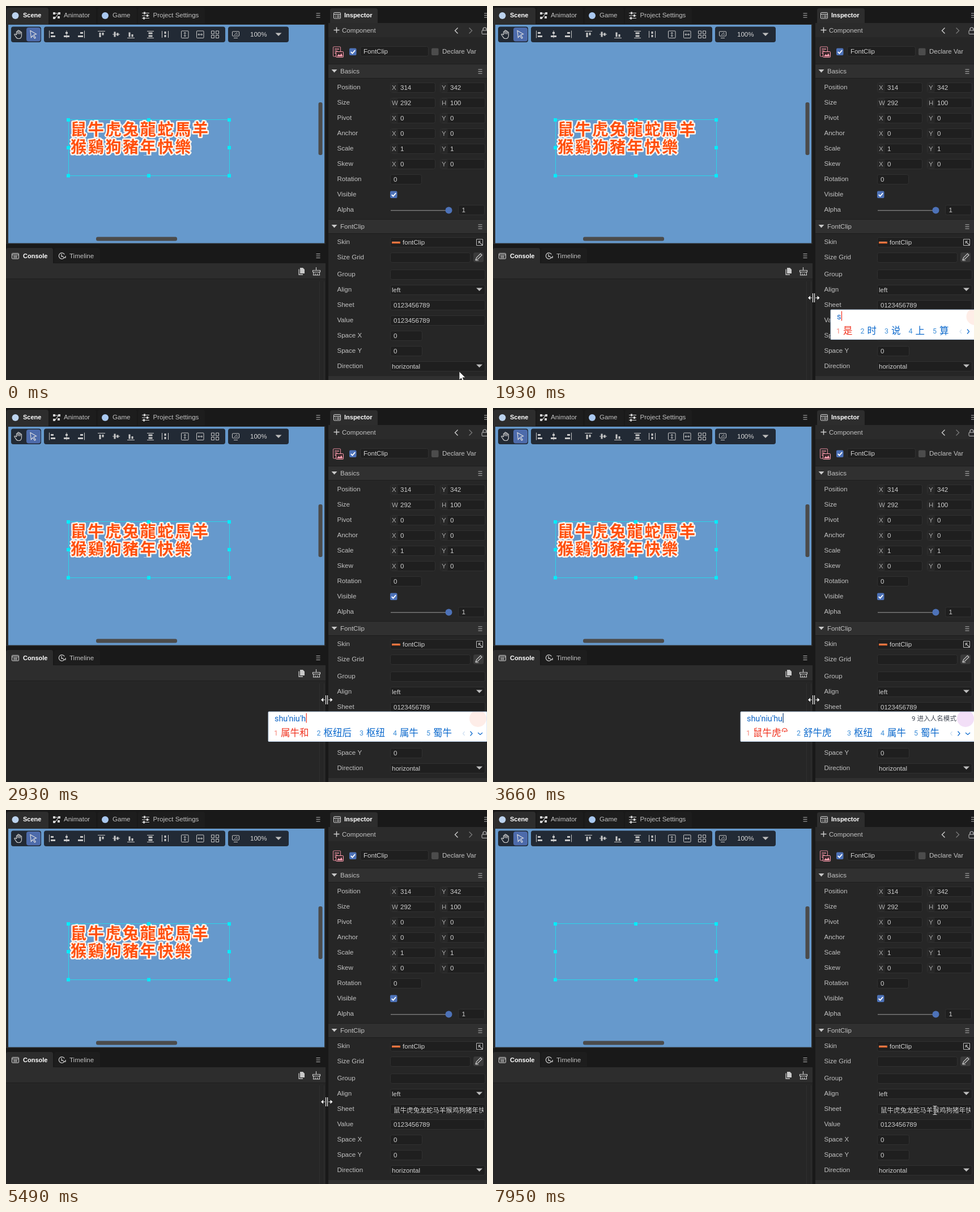
Animation of 849x660 px, one loop 8 s. Source, as an HTML page with a canvas:

```html
<!DOCTYPE html>
<html lang="en">
<head>
<meta charset="utf-8">
<title>Font clip editor</title>
<style>
html, body { margin: 0; width: 100%; height: 100%; overflow: hidden; background: #191919; }
canvas { display: block; }
</style>
</head>
<body>
<canvas id="stage" width="849" height="660"></canvas>
<script>
const g = document.getElementById('stage').getContext('2d');
const LOOP = 8000;
const UI = '11.55px "Liberation Sans", Arial, sans-serif';
const BOLD = 'bold 11px "Liberation Sans", Arial, sans-serif';
const CJK = '"Noto Sans CJK SC", "Noto Sans CJK", sans-serif';
const LABEL = '#c2c2c2', ICON = '#c8c8c8';
const ZODIAC = '鼠牛虎兔龙蛇马羊猴鸡狗猪年快乐';

function box(x, y, w, h, fill, r = 0, stroke) {
  g.beginPath();
  g.roundRect(x, y, w, h, r);
  if (fill) { g.fillStyle = fill; g.fill(); }
  if (stroke) { g.strokeStyle = stroke; g.lineWidth = 1; g.stroke(); }
}
function text(s, x, y, color = LABEL, font = UI, align = 'left') {
  g.font = font;
  g.fillStyle = color;
  g.textAlign = align;
  g.fillText(s, x, y);
}
function line(d, color = ICON, w = 1) {
  g.strokeStyle = color;
  g.lineWidth = w;
  g.stroke(new Path2D(d));
}
function shape(d, color = ICON) {
  g.fillStyle = color;
  g.fill(new Path2D(d));
}
function dot(x, y, r, color) {
  g.beginPath();
  g.arc(x, y, r, 0, 7);
  g.fillStyle = color;
  g.fill();
}
function clipped(x, y, w, h, draw) {
  g.save();
  g.beginPath();
  g.rect(x, y, w, h);
  g.clip();
  draw();
  g.restore();
}

const menu = (x, y) => line(`M${x - 3.5} ${y - 3.5}h7m-7 3.5h7m-7 3.5h7`, '#b5b5b5', 1.1);
const down = (x, y) => shape(`M${x - 5.5} ${y - 2.5}h11l-5.5 5.5z`, '#bdbdbd');
const field = (x, y, w, h = 18) => box(x + .5, y + .5, w - 1, h - 1, '#1f1f1f', 3, '#313131');
const tab = (x, y, w, h, on) => box(x, y, w, h, on ? '#2d2d2d' : '#1d1d1d', [4, 4, 0, 0]);
function check(x, y, on) {
  box(x, y, 12.5, 12.5, on ? '#4d72b8' : '#4c4c4c', 2);
  if (on) line(`M${x + 2.8} ${y + 6.3}l2.6 2.9 4.8-5.6`, '#fff', 1.8);
}
function pair(y, name, a, u, b, v) {
  text(name, 584.5, y + 4);
  [[678, a, u, 80], [766, b, v, 80]].forEach(([x, key, val, w]) => {
    field(x, y - 8, w);
    box(x + 1, y - 7, 13, 16, '#282828', 2);
    text(key, x + 3, y + 5, '#a8a8a8');
    text(val, x + 18, y + 5, '#d0d0d0');
  });
}
function row(y, name, val, w, x = 684) {
  text(name, 584.5, y + 4);
  field(678, y - 8, w);
  if (val) text(val, x, y + 5, '#d0d0d0');
}

function toolbar() {
  for (const [x, w] of [[9, 53], [67, 320], [392, 107]]) box(x, 36.5, w, 27.5, '#222a35', 4);
  box(36, 38, 25, 24.5, '#4d6bab', 4);
  line('M18.5 51v-5.500q1.200-1.500 2.200 0v4v-6q1.200-1.500 2.200 0v6v-5q1.200-1.500 2.200 0v5.500v-3.500q1.400-1.300 2.400 0v5q0 6-4.500 6h-1.500q-2.500 0-4-3l-2.800-4q.8-2.300 3.800.5', '#d8d8d8', 1.1);
  line('M43 43.500l10.500 6-4.500 1.500 3.300 5-1.800 1.300-3.200-5-3 3.300z', '#e2e2e2', 1.1);
  line('M76.500 43.500v13M107 43.500v13M138.500 43.500v13M162 44.500h13M188 50h13M214 56.500h13');
  line('M79 47.500h5m-5 6h8M105 47.500h4m-7 6h10M131 47.500h5m-9 6h9', ICON, 3.2);
  line('M166 47v8m5-8v4.500M192 45.500v9m5-7v5M218 46.500v8m5-4.500v4.500', ICON, 3);
  line('M249 44.500h12m-12 12h12M275.500 44v12m11-12v12');
  line('M251.500 48h7m-7 5h7M281 45v4m0 2v4', ICON, 3);
  g.strokeStyle = ICON;
  box(309.500, 44, 12.500, 12.500, null, 1, ICON);
  box(336.500, 44, 12.500, 12.500, null, 1, ICON);
  line('M315.800 46.500v7.500m-2-5.500l2-2 2 2m-4 3.500l2 2 2-2M339 50.300h7.500m-5.500-2l-2 2 2 2m3.500-4l2 2-2 2');
  for (const x of [362.5, 370.5]) for (const y of [44, 51.5]) box(x, y, 5, 5, null, 0, ICON);
  box(399.5, 45, 12, 8, null, 1, ICON);
  line('M402 56.500h7M403 51l5-4M407 51l2-2');
  text('100%', 431, 54, '#d8d8d8');
  down(481, 50);
}

function scene(showGlyphs) {
  tab(1, 3, 74, 30, true);
  tab(77, 3, 82, 28);
  tab(162, 3, 69, 28);
  tab(233, 3, 118, 28);
  box(0, 32, 564, 388, '#2a2a2a');
  box(4, 33, 558, 385.500, '#6699cc');
  dot(16.5, 17, 6, '#bcd3ee');
  text('Scene', 30, 20, '#fff', BOLD);
  shape('M83 11h4v4h-4zM92 11h4v4h-4zM83 19h4v4h-4zM91 18h4v4h-4z', '#d5d5d5');
  line('M87 13h5M87 21l5-7', '#d5d5d5', 1.2);
  text('Animator', 102, 20);
  dot(175, 17, 6, '#a9c8f0');
  text('Game', 188, 20);
  line('M240 12.500h13M240 17h13M240 21.500h13', '#d5d5d5', 1.2);
  shape('M243 10.500h3v4h-3zM248 15h3v4h-3zM242 19.500h3v4h-3z', '#d5d5d5');
  text('Project Settings', 259.5, 20);
  menu(551, 16.5);
  toolbar();
  box(551.5, 170, 7, 93, '#4b4b4b', 3);
  box(159, 407.500, 143, 7, '#4b4b4b', 3);

  if (showGlyphs) {
    g.lineJoin = 'round';
    g.font = '800 28px "Noto Sans CJK TC", ' + CJK;
    g.textAlign = 'center';
    const each = draw => ['鼠牛虎兔龍蛇馬羊', '猴鷄狗豬年快樂'].forEach((s, r) =>
      [...s].forEach((c, i) => draw(c, 128 + i * 30.7, 227.5 + r * 31)));
    g.strokeStyle = '#fff2ea';
    g.lineWidth = 5;
    each((c, x, y) => g.strokeText(c, x, y));
    g.fillStyle = '#ff4f0c';
    each((c, x, y) => g.fillText(c, x, y));
    g.lineJoin = 'miter';
    line('M208 263.500h24M243 263.500h14', '#c9d9e9aa');
  }
  box(110.5, 200.500, 284, 99, null, 0, '#2bd5e8');
  for (const x of [110, 252, 394]) for (const y of [201, 250, 299.5])
    if (x !== 252 || y !== 250) box(x - 3, y - 3, 6, 6, '#00ecfa');
}

function consolePanel() {
  tab(0, 427, 83, 27, true);
  tab(85, 427, 81, 26);
  box(0, 454, 564, 206, '#262626');
  box(0, 454, 564, 27, '#2d2d2d');
  box(0, 481, 564, 1, '#1e1e1e');
  box(553, 486, 1, 174, '#2f2f2f');
  box(561, 486, 1, 174, '#2f2f2f');
  box(10.5, 436.500, 12, 9.500, null, 1, '#ddd');
  line('M10 439h13M13 441.500h7M13 443.800h7', '#ddd');
  text('Console', 30, 444.500, '#fff', BOLD);
  line('M103 444a5.300 5.300 0 1 1 .3-5.500M98 437.500v4.500h3.500M101 444h4v-3', '#c8c8c8', 1.3);
  text('Timeline', 112, 444.500);
  menu(551, 441);
  shape('M519 462h5l3 3v7h-8z', '#c8c8c8');
  line('M517 464.500v9.500h7', '#c8c8c8', 1.3);
  line('M547.500 461v5M541.500 466.500h13v3h-13zM543 469.500l-.5 5.500h11l-.5-5.500M546 475v-3m3.500 3v-3', '#c8c8c8', 1.2);
}

function header(y, name) {
  box(569, y - 13, 280, 26, '#303030');
  box(569, y - 13, 280, 1, '#1d1d1d');
  box(569, y + 12, 280, 1, '#1d1d1d');
  shape(`M574.500 ${y - 3}h10l-5 5.500z`, '#c8c8c8');
  text(name, 590, y + 4);
  menu(837, y + .5);
}

function inspector() {
  tab(572, 4, 84, 27, true);
  box(569, 30, 280, 630, '#262626');
  box(569, 30, 280, 25, '#2b2b2b');
  box(578.5, 11.500, 12, 10.500, null, 1, '#ddd');
  line('M578 14.500h13M581 17h1.500m1.500 0h5M581 19.500h1.500m1.500 0h5', '#ddd');
  text('Inspector', 597, 20, '#fff', BOLD);
  menu(847.5, 16.5);
  line('M583.500 37.500v10M578.500 42.500h10', '#d0d0d0', 1.4);
  text('Component', 593, 46.500);
  line('M797.500 38.500l-5 5 5 5', '#d0d0d0', 1.4);
  line('M817.500 38.500l5 5-5 5', '#787878', 1.4);
  box(840, 43, 10, 6.500, null, 1, '#c0c0c0');
  line('M842 43v-2q0-3 3-3t3 3v2', '#c0c0c0', 1.2);

  box(577.5, 72, 13, 17, null, 1, '#e58a9c');
  line('M580 76h8M580 79.500h5M580 83h3', '#e58a9c', 1.3);
  box(582.5, 80.500, 13, 10, '#3a272b', 1, '#ff9fb0');
  shape('M584 89l3-4 2.500 2 2.500-3.500 2.500 5.500z', '#ff9fb0');
  check(606, 74.5, true);
  field(625, 71, 121);
  text('FontClip', 631, 84, '#d0d0d0');
  check(751, 74.5, false);
  text('Declare Var', 770, 84);

  header(115, 'Basics');
  pair(143, 'Position', 'X', '314', 'Y', '342');
  pair(170, 'Size', 'W', '292', 'H', '100');
  pair(197, 'Pivot', 'X', '0', 'Y', '0');
  pair(224, 'Anchor', 'X', '0', 'Y', '0');
  pair(251, 'Scale', 'X', '1', 'Y', '1');
  pair(278, 'Skew', 'X', '0', 'Y', '0');
  row(305, 'Rotation', '0', 56);
  text('Visible', 584.5, 336);
  check(678, 326.5, true);
  text('Alpha', 584.5, 363);
  box(679, 360, 102, 1.500, '#777');
  dot(781.5, 360.5, 6, '#4d72b8');
  field(798, 351, 47);
  text('1', 804.5, 364, '#d0d0d0');

  header(389, 'FontClip');
  row(416, 'Skin', 'fontClip', 168, 700);
  line('M681 417.500h15', '#e2672f', 3.5);
  line('M682 416.500h12', '#f2a27d', .8);
  box(830.5, 411.500, 11, 11, null, 0, '#bbb');
  line('M834 415h4M834.500 415v4M834 415l7 7', '#bbb', 1.2);
  row(443, 'Size Grid', '', 142);
  box(825, 435, 18, 17, '#3a3a3a', 3);
  line('M829 448l1.500-4 7-7 2.500 2.500-7 7zM829 449h5', '#c8c8c8', 1.2);
  row(473, 'Group', '', 168);
  row(500, 'Align', 'left', 168, 681);
  down(835.5, 500);
  row(527, 'Sheet', '', 168);
  row(554, 'Value', '0123456789', 168);
  row(581, 'Space X', '0', 57);
  row(608, 'Space Y', '0', 57);
  row(635, 'Direction', 'horizontal', 168, 681);
  down(835.5, 635);
  box(569, 653, 280, 7, '#303030');
}

// [start, last step, step count, waypoints]
const moves = [
  [70, 400, 6, [[800, 645], [784, 600], [768, 558], [762, 535]]],
  [670, 1070, 6, [[762, 535], [742, 536], [650, 530], [563, 512], [566, 515]]],
  [6180, 6860, 11, [[566, 515], [610, 494], [700, 512], [786, 536], [794, 531]]],
  [6990, 7210, 4, [[794, 531], [783, 530], [785, 530]]],
  [7610, 7950, 5, [[785, 530], [771, 526], [780, 530]]]
];
function pointer(t) {
  const [t0, t1, n, pts] = moves.findLast(m => t >= m[0]) || [0, 1, 1, [[800, 645], [800, 645]]];
  const k = Math.min(n, Math.floor((t - t0) / (t1 - t0) * (n - 1) + 1e-6) + 1);
  const u = t < 70 ? 0 : k / n * (pts.length - 1);
  const i = Math.min(Math.floor(u), pts.length - 2), f = u - i;
  return [0, 1].map(a => Math.round(pts[i][a] + (pts[i + 1][a] - pts[i][a]) * f));
}
function drawPointer(t, [x, y]) {
  const dragging = t >= 670 && t < 1070;
  const inField = x >= 678 && [527, 554].some(c => Math.abs(y - c - 1) < 10);
  g.save();
  g.translate(x, y);
  if (x < 572) {
    line('M-1.500-8v16M1.500-8v16M-3 0h-6M3 0h6', '#111', 3);
    line('M-1.500-8v16M1.500-8v16M-3 0h-6M3 0h6', '#fff', 1.2);
    shape('M-10 0l4-3.500v7zM10.500 0l-4-3.500v7z', '#fff');
  } else if (dragging || inField) {
    const beam = 'M-3.500-7.500h2.500l1 1 1-1h2.500M0-6.500v13M-3.500 7.500h2.500l1-1 1 1h2.500';
    line(beam, '#202020', 2.5);
    line(beam, '#e4e4e4', 1.2);
  } else {
    shape('M0 0v15l3.500-3.300 2.300 5.300 2.500-1-2.300-5.200h5z', '#fff');
    line('M0 0v15l3.500-3.300 2.300 5.300 2.500-1-2.300-5.200h5z', '#222', .7);
  }
  g.restore();
}

// [start, left edge, typed, candidates, hint]; a trailing space widens the gap
const cloudy = '鼠牛虎 ,舒牛虎 ,枢纽,属牛,蜀牛';
const full = `鼠牛虎兔,${ZODIAC},枢纽,属牛,蜀牛`;
const typing = [
  [1930, 596, 's', '是,时,说,上,算'],
  [2060, 596, 'sh', '是,上,说,时,双'],
  [2190, 579, 'shu', '数,书,树,输,舒服'],
  [2410, 569, 'shun', '顺,瞬,舜,吮,shunt'],
  [2600, 546, "shu'ni", '属你,数你,输你,数,书'],
  [2730, 546, "shu'niu", '属牛,枢纽,蜀牛,数,书'],
  [2930, 463, "shu'niu'h", '属牛和,枢纽后,枢纽,属牛,蜀牛'],
  [3000, 463, "shu'niu'hu", '鼠牛虎,舒牛虎,枢纽,属牛,蜀牛'],
  [3130, 437, "shu'niu'hu", cloudy],
  [3460, 437, "shu'niu'hu", cloudy, '9 进入人名模式'],
  [3990, 187, "shu'niu'hu't", `鼠牛虎兔 ,${ZODIAC} ,书牛虎兔,枢纽,属牛`],
  [4190, 187, "shu'niu'hu'tu", full],
  [4590, 187, "shu'niu'hu'tu", full, '9 进入生僻字模式']
];
function inputPopup(t) {
  const [start, left, typed, list, hint] = typing.findLast(s => t >= s[0]);
  const size = s => s === 'shunt' ? 42 : s.length * 16.5;
  let x = left + 10.5;
  const items = list.split(',').map((raw, i) => {
    const s = raw.trim(), item = { s, i, x, pad: raw !== s };
    x += 26 + size(s) + (item.pad ? 13.5 : 0);
    return item;
  });
  const right = x - 14.5 + 62;
  box(left, 536, right - left, 52.500, '#fff', 1, '#bcd2ea');
  clipped(left, 536, right - left, 52, () =>
    dot(right - 16, 548, 15, start === 3130 || start === 3460 ? '#d9a0e655' : '#f5785022'));

  text(typed, left + 11, 553, '#0b62c4', '14.3px Roboto, sans-serif');
  const end = left + 11.5 + g.measureText(typed).width;
  box(end, 538.500, 1.200, 17, start === 3130 || start === 3460 ? '#123a70' : '#f03020');
  if (hint) text(hint, right - 32, 552, '#3f4652', '11.6px Roboto, ' + CJK, 'right');

  for (const { s, i, x, pad } of items) {
    const first = i === 0;
    text(i + 1, x - .5, 578, first ? '#f58478' : '#3f8fd8', '12.5px Roboto, sans-serif');
    text(s, x + 11.5, 579, first ? '#f0321e' : '#0a68cc', '16.5px ' + (s === 'shunt' ? 'Roboto, sans-serif' : CJK));
    if (first && pad) {
      const c = x + 12 + size(s);
      line(`M${c + 3} 571q-3-1-1-3 1-3.500 4.500-2.500 3 .5 3 2.500 2 2-1 3M${c + 4} 569l2 2.500 2-2.500`, '#f0321e', 1.1);
    }
  }
  line(`M${right - 39.5} 571l-3 3.500 3 3.500`, '#cfe0f2', 1.2);
  line(`M${right - 29.5} 570.500l3.500 4-3.500 4`, '#0a68cc', 1.2);
  line(`M${right - 16} 573l4 3.500 4-3.500`, '#0a68cc', 1.2);
}

function sheetField(t, px) {
  if (t >= 5490) {
    clipped(680, 518, 163, 20, () => text(ZODIAC, 684, 533.500, '#d0d0d0', '11.55px ' + CJK));
    return;
  }
  const digits = '0123456789', w = 6.423;
  text(digits, 684, 532, '#d0d0d0');
  if (t >= 670 && t < 1930) {
    const from = 684 + Math.max(0, Math.min(10, Math.round((px - 684) / w))) * w;
    clipped(from, 521, 748.5 - from, 15, () => {
      box(from, 521, 748.5 - from, 15, '#0b63ce');
      text(digits, 684, 532, '#fff');
    });
  }
  const blink = Math.floor((t - 3130) / 530) % 2 === 0;
  if ((t >= 1930 && blink) || t >= 5180) box(748, 522, 1, 13, '#ddd');
}

function frame(now) {
  const t = now % LOOP, p = pointer(t);
  box(0, 0, 849, 660, '#191919');
  scene(t < 5520);
  consolePanel();
  inspector();
  sheetField(t, p[0]);
  if (t >= 1930 && t < 5490) inputPopup(t);
  drawPointer(t, p);
}

const begin = performance.now();
function tick() {
  frame(performance.now() - begin);
  requestAnimationFrame(tick);
}
tick();
</script>
</body>
</html>
```
